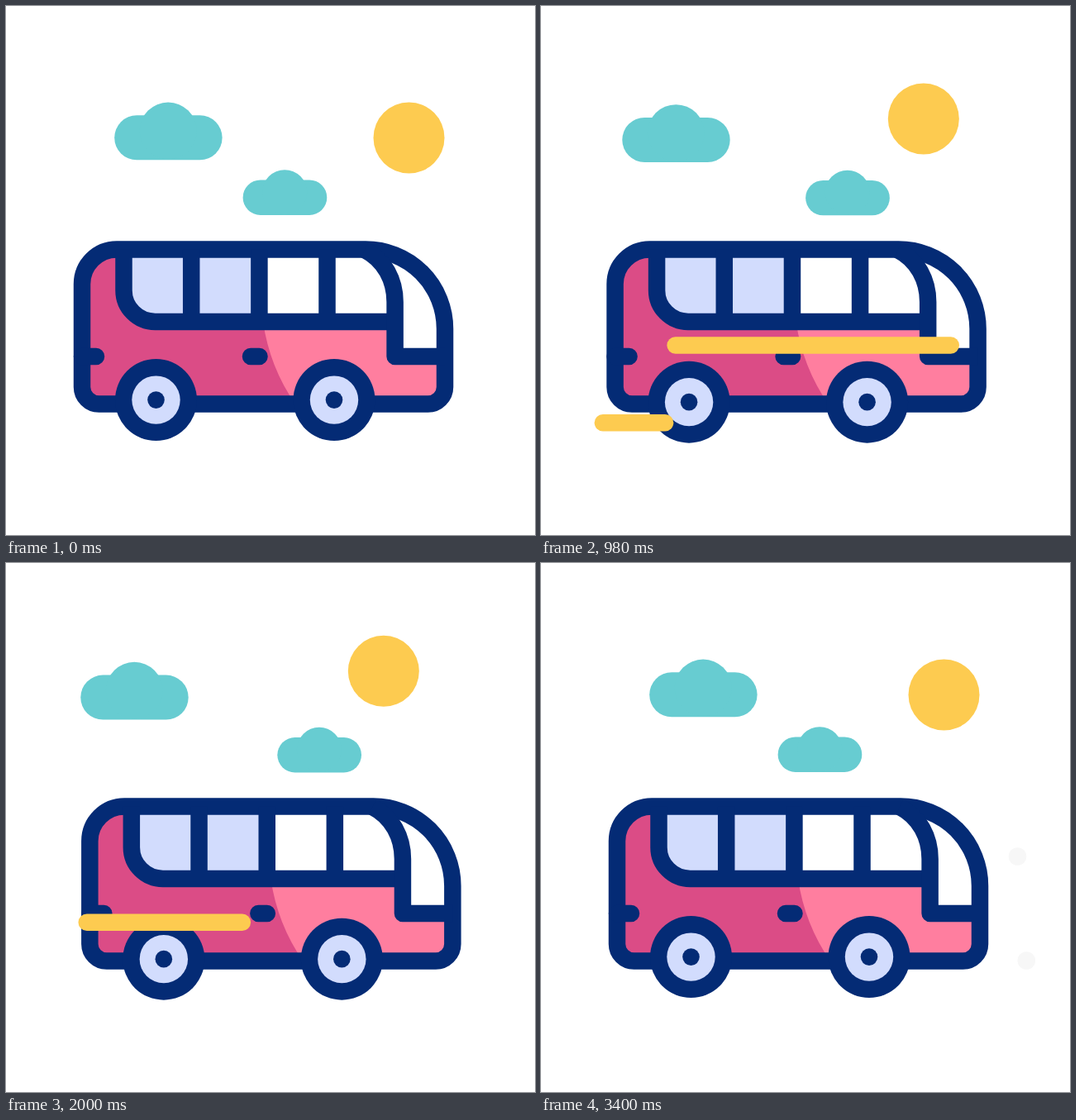
An HTML page for the animation above (3520 ms loop, 640 by 640 pixels).

```html
<!DOCTYPE html>
<html lang="en">
<head>
<meta charset="utf-8">
<title>Bus ride</title>
<style>
  html, body { margin: 0; width: 100%; height: 100%; overflow: hidden; background: #fff; }
  svg { display: block; width: 100%; height: 100%; }
  .navy { fill: #042b75; }
  .lilac { fill: #d2dcfd; }
  .teal { fill: #67ccd1; }
  .sun { fill: #fdcb50; }
  .frame { fill: none; stroke: #042b75; stroke-width: 20.5; stroke-linejoin: round; }
  .streak { stroke: #fdcb50; stroke-width: 20.5; stroke-linecap: round; }
  .puff { fill: #f7f7f7; }
</style>
</head>
<body>
<svg viewBox="0 0 640 640">
  <circle id="sun" class="sun" cx="487.5" cy="159.5" r="43"/>
  <g id="bigCloud" class="teal">
    <rect x="131.2" y="132.3" width="130.4" height="54" rx="27"/>
    <circle cx="196.2" cy="151" r="34.5"/>
  </g>
  <g id="smallCloud" class="teal">
    <rect x="286.6" y="210.5" width="101.7" height="42.4" rx="21.2"/>
    <circle cx="337.2" cy="225.2" r="27"/>
  </g>
  <g id="puffs">
    <circle class="puff" cx="576.5" cy="355" r="10.8"/>
    <circle class="puff" cx="587.3" cy="481" r="10.8"/>
  </g>
  <g id="bus">
    <path fill="#ff7e9f" d="M300 382H470.5V424H531V461A20.5 20.5 0 0 1 510.5 481.5H300Z"/>
    <path fill="#db4c86" d="M142.5 294.5H134A42 42 0 0 0 92 336.5V461A20.5 20.5 0 0 0 112.5 481.5H350Q319 437 311 382H180.5A38 38 0 0 1 142.5 344Z"/>
    <path class="lilac" d="M142.5 294.5H306V382H180.5A38 38 0 0 1 142.5 344Z"/>
    <path class="frame" d="M92 336.5A42 42 0 0 1 134 294.5H435A96 96 0 0 1 531 390.5V461A20.5 20.5 0 0 1 510.5 481.5H112.5A20.5 20.5 0 0 1 92 461Z"/>
    <path class="frame" d="M142.5 294.5V344A38 38 0 0 0 180.5 382H470.5M224.2 294.5V382M306.4 294.5V382M388.5 294.5V382"/>
    <path class="frame" d="M434 295C458 307 470.6 332 470.6 358V424H531"/>
    <path class="frame" stroke-linecap="round" d="M92 424H109M296 424H306.5"/>
    <g id="wheels"></g>
  </g>
  <g id="streaks"></g>
</svg>
<script>
const NS = 'http://www.w3.org/2000/svg';
const LOOP = 3520, STEP = 20, START = 100, END = 3400;
const $ = id => document.getElementById(id);

const clamp = u => Math.min(1, Math.max(0, u));
const span = (t, from, to) => clamp((t - from) / (to - from));
const smooth = u => u * u * (3 - 2 * u);
const easeOut = u => 1 - (1 - u) * (1 - u);

// [time, value] keys joined by an easing
function track(keys, t, ease) {
  let i = 1;
  while (i < keys.length - 1 && t > keys[i][0]) i++;
  const [t0, a] = keys[i - 1], [t1, b] = keys[i];
  return a + (b - a) * ease(span(t, t0, t1));
}

const sway = [[START, 0], [640, 10.2], [1280, -12.9], [1920, 10.5], [2520, -13.4], [3400, 0]];
const bounce = [[START, 0], [640, 0.85], [1340, 2.3], [2000, 3.45], [2440, 4], [2800, 4.86], [3380, 6]];

const streaks = [
  { y: 504.2, x0: 541, x1: 49, head: [402, 1152], tail: [570, 1320] },
  { y: 410.5, x0: 541, x1: 39, head: [645, 1310], tail: [950, 1600] },
  { y: 434.8, x0: 600, x1: 18.5, head: [1412, 2344], tail: [1670, 2695] }
];

function add(parent, tag, attrs) {
  const el = document.createElementNS(NS, tag);
  for (const k in attrs) el.setAttribute(k, attrs[k]);
  return parent.appendChild(el);
}

for (const cx of [181.5, 397])
  for (const [r, cls] of [[49.5, 'navy'], [29.2, 'lilac'], [10.3, 'navy']])
    add($('wheels'), 'circle', { cx, cy: 476.6, r, class: cls });

for (const s of streaks)
  s.el = add($('streaks'), 'line', { class: 'streak', y1: s.y, y2: s.y });

function move(id, x, y) {
  $(id).setAttribute('transform', `translate(${x.toFixed(2)} ${y.toFixed(2)})`);
}

function draw(ms) {
  let t = Math.floor((ms % LOOP) / STEP) * STEP;
  t = t < START + STEP ? 0 : Math.min(t, END);

  const drift = Math.min(smooth(span(t, 190, 1530)), 1 - smooth(span(t, 1500, 3180)));
  move('sun', -39 * drift, -36.4 * drift);
  move('bigCloud', -52 * drift, 4.2 * drift);
  move('smallCloud', 53 * drift, 0.7 * drift);

  move('bus', track(sway, t, smooth), 0);
  const phase = track(bounce, t, u => u);
  move('wheels', 0, 1.3 * (1 - Math.cos(2 * Math.PI * phase)));

  for (const s of streaks) {
    const at = ([from, to]) => s.x0 + (s.x1 - s.x0) * easeOut(span(t, from, to));
    const head = at(s.head), tail = at(s.tail);
    s.el.setAttribute('x1', head);
    s.el.setAttribute('x2', tail);
    s.el.setAttribute('visibility', tail - head > 0.3 ? 'visible' : 'hidden');
  }

  const puff = span(t, 3300, END);
  move('puffs', 20 * (1 - puff), 0);
  $('puffs').setAttribute('opacity', puff);
}

let t0 = null;
function tick(now) {
  if (t0 === null) t0 = now;
  draw(now - t0);
  requestAnimationFrame(tick);
}
draw(0);
requestAnimationFrame(tick);
</script>
</body>
</html>
```
